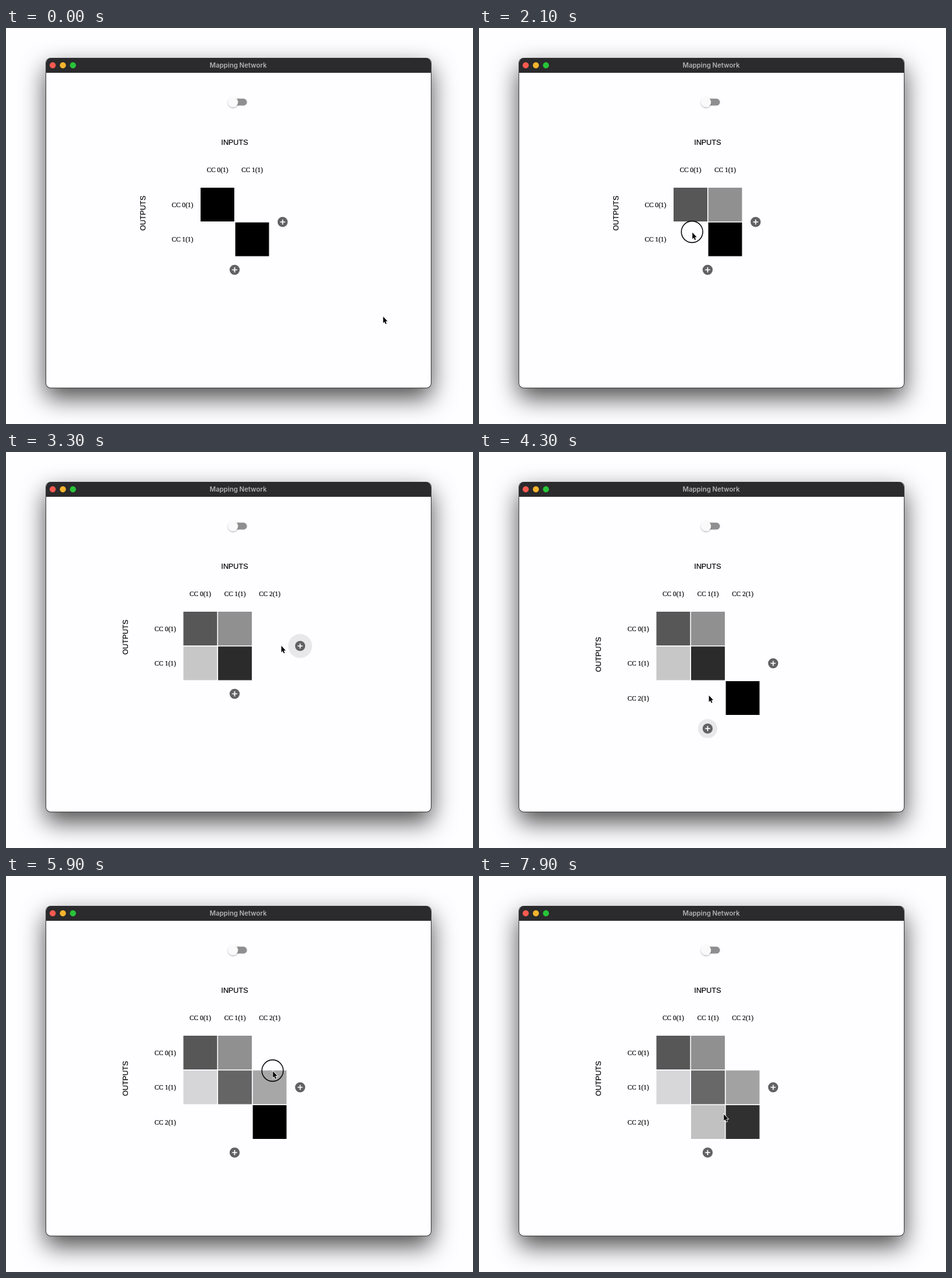
Animation, 720 px wide and 610 px high, one loop 8 s. Source, as an HTML page:

```html
<!DOCTYPE html>
<html lang="en">
<head>
<meta charset="utf-8">
<title>Mapping Network</title>
<style>
  html, body { margin: 0; width: 100%; height: 100%; overflow: hidden; background: #fefdff; }
  #window {
    position: absolute; left: 61px; top: 46px; width: 595px; height: 509px;
    border-radius: 8px; background: #fefdff; overflow: hidden;
    box-sizing: border-box; border: 1px solid #444; border-top: 0;
    box-shadow: 0 15px 37px rgba(0, 0, 0, .7);
  }
  #bar { height: 23px; background: #2b2a2c; margin: 0 -1px; }
  svg { position: absolute; left: 0; top: 0; }
  text { text-anchor: middle; }
  .title { font: 600 10.2px Inter, sans-serif; fill: #b3b1b4; }
  .axis, .label { stroke: #000; stroke-width: .18px; }
  .axis { font: 11.3px "Liberation Sans", Arial, sans-serif; }
  .label { font: 10.2px "Liberation Serif", Times, serif; }
</style>
</head>
<body>
<div id="window"><div id="bar"></div></div>
<svg width="720" height="610">
  <defs>
    <filter id="soft" x="-50%" y="-50%" width="200%" height="200%">
      <feDropShadow dx="0" dy="1" stdDeviation="1" flood-opacity=".35"/>
    </filter>
    <g id="plus">
      <circle r="7.8" fill="#616063"/>
      <path d="M-3.9 0H3.9M0-3.9V3.9" stroke="#fff" stroke-width="1.6"/>
    </g>
  </defs>
  <circle cx="72" cy="57.5" r="4.7" fill="#fb5a50"/>
  <circle cx="87.7" cy="57.5" r="4.7" fill="#f6b52e"/>
  <circle cx="103.2" cy="57.5" r="4.7" fill="#29c33a"/>
  <text class="title" x="358" y="61">Mapping Network</text>
  <rect x="344" y="108.8" width="27.5" height="10.8" rx="5.4" fill="#8f8e90"/>
  <circle cx="350" cy="114.2" r="7.8" fill="#fafafa" filter="url(#soft)"/>
  <text class="axis" x="352.5" y="180">INPUTS</text>
  <g id="grid"></g>
  <circle id="ring" r="16.5" fill="none" stroke="#000" stroke-width="1.4"/>
  <g id="cursor">
    <path d="M.5 1V11L2.6 9 4.2 12.6 5.8 11.9 4.2 8.3H7.2Z"
          stroke="#fff" stroke-width="1.4" paint-order="stroke"/>
  </g>
</svg>
<script>
const LOOP = 8000, STEP = 100, PITCH = 53.5, SIZE = 52, TOP = 246, MID = 353.6;
const PIXELS_PER_UNIT = 65, DAMPING = .8, RIPPLE = 18.5;
const $ = id => document.getElementById(id);

// The pointer visits these in turn: drags lift a cell's weight, clicks add a line.
const addInput = { from: 3000, to: 3400, x: 424, y: 297.5 };
const addOutput = { from: 4100, to: 4400, x: 354, y: 374 };
const actions = [
  { from: 0, to: 0, x: 581, y: 443.5 },
  { from: 1100, to: 1500, x: 375, y: 248, lift: 28, row: 0, col: 1 },
  { from: 2100, to: 2500, x: 328.5, y: 314, lift: 14, row: 1, col: 0 },
  addInput,
  addOutput,
  { from: 5300, to: 6000, x: 411, y: 322, lift: 23.5, row: 1, col: 2 },
  { from: 6700, to: 7100, x: 377, y: 381.5, lift: 15.6, row: 2, col: 1 }
];
const drags = actions.filter(a => a.lift);

function ease(t, from, to) {
  const p = Math.min(1, Math.max(0, (t - from) / (to - from || 1)));
  return p * p * (3 - 2 * p);
}

const active = (a, t) => t >= a.from && t < a.to;
const lifted = (a, t) => a.lift ? a.lift * ease(t, a.from, a.to) : 0;

function pointer(t) {
  let { x, y } = actions[0];
  actions.forEach((a, i) => {
    if (!i) return;
    const p = ease(t, actions[i - 1].to, a.from);
    x += (a.x - x) * p;
    y += (a.y - y) * p - lifted(a, t);
  });
  return [x, y];
}

// Each row starts with its diagonal cell full; a drag damps the rest of its row.
function weights(t) {
  const w = [[1, 0, 0], [0, 1, 0], [0, 0, 1]];
  for (const d of drags) {
    const gain = lifted(d, t) / PIXELS_PER_UNIT;
    w[d.row] = w[d.row].map((v, c) => c === d.col ? v + gain : v * (1 - DAMPING * gain));
  }
  return w;
}

const label = (x, y, n) => `<text class="label" x="${x}" y="${y + 3.5}">CC ${n}(1)</text>`;

function button(x, y, click, t) {
  const r = RIPPLE * Math.min(1, .4 + (t - click.from) / 500);
  const glow = active(click, t) ? `<circle r="${r}" fill-opacity=".085"/>` : "";
  return `<g transform="translate(${x} ${y})">${glow}<use href="#plus"/></g>`;
}

function grid(t) {
  const cols = t < addInput.from ? 2 : 3, rows = t < addOutput.from ? 2 : 3;
  const left = Math.round(2 * MID - cols * PITCH) / 2;
  const midY = TOP + rows * PITCH / 2;
  const w = weights(t);
  let out = "";
  for (let c = 0; c < cols; c++) out += label(left + c * PITCH + SIZE / 2, 218.5, c);
  for (let r = 0; r < rows; r++) {
    const y = TOP + r * PITCH;
    out += label(left - 28, y + SIZE / 2, r);
    for (let c = 0; c < cols; c++) {
      out += `<rect x="${left + c * PITCH}" y="${y}" width="${SIZE}" height="${SIZE}" fill-opacity="${w[r][c]}"/>`;
    }
  }
  out += `<text class="axis" transform="translate(${left - 85.5} ${midY - 14.3}) rotate(-90)">OUTPUTS</text>`;
  out += button(left + cols * PITCH + 19.5, midY - .7, addInput, t);
  return out + button(352.5, TOP + rows * PITCH + 19.5, addOutput, t);
}

function draw(now) {
  const t = Math.floor(now % LOOP / STEP) * STEP;
  const [x, y] = pointer(t);
  const move = `translate(${x} ${y})`;
  $("grid").innerHTML = grid(t);
  $("cursor").setAttribute("transform", move);
  $("ring").setAttribute("transform", move);
  $("ring").style.display = drags.some(d => active(d, t)) ? "" : "none";
}

const start = performance.now();
function tick() {
  draw(performance.now() - start);
  requestAnimationFrame(tick);
}
tick();
</script>
</body>
</html>
```
